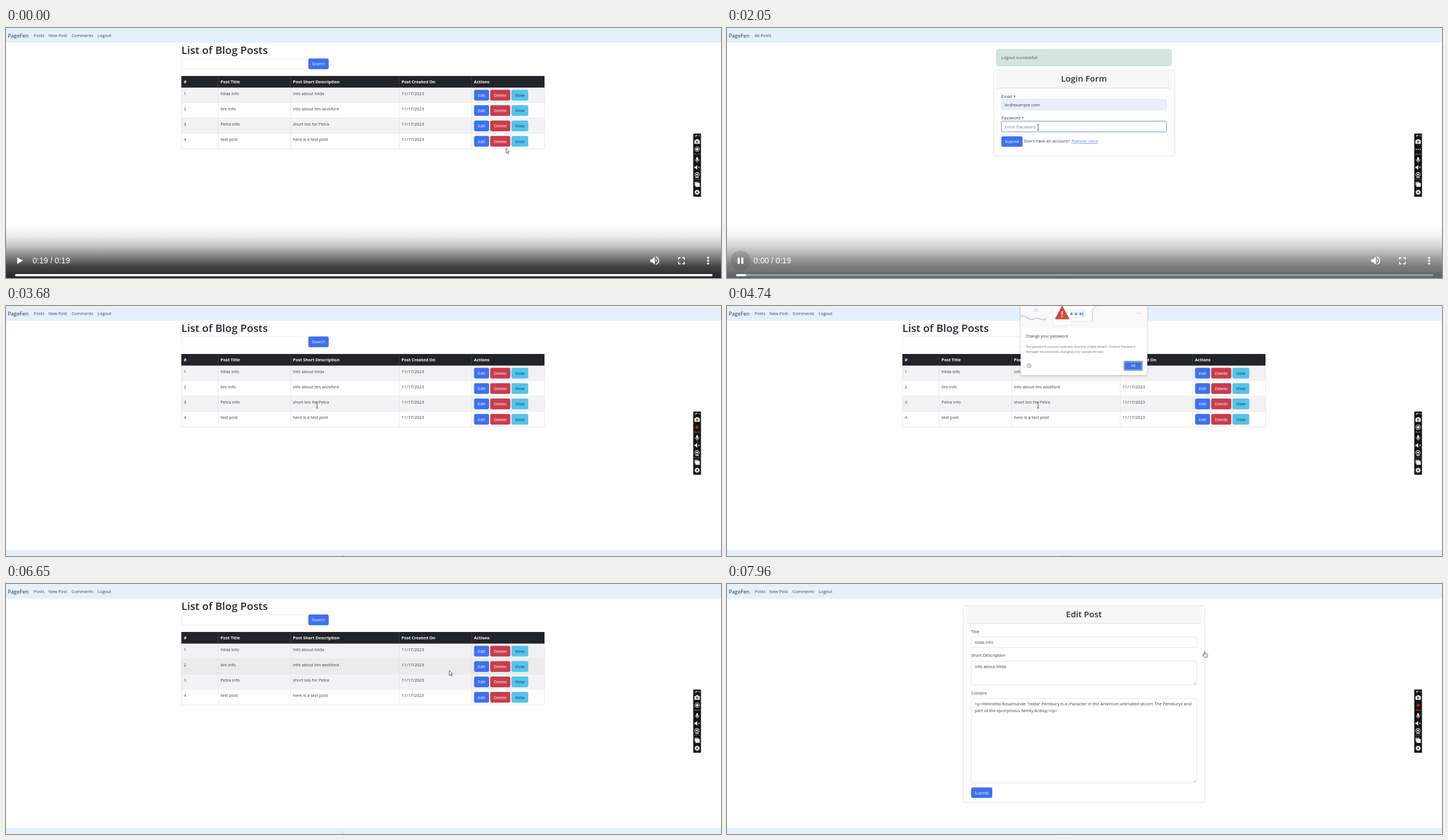
Write an HTML page that moves like this. It is 1264x443 px and loops after 7990 ms.

```html
<!DOCTYPE html>
<html lang="en">
<head>
<meta charset="utf-8">
<title>Blog demo</title>
<style>
html, body { margin: 0; width: 100%; height: 100%; overflow: hidden; background: #fefefe; }
svg { display: block; width: 1264px; height: 443px; }
text { font-family: "Open Sans", "Noto Sans", sans-serif; white-space: pre; }
.clock { font-family: "Liberation Sans", Arial, sans-serif; }
</style>
</head>
<body>
<svg id="stage" viewBox="0 0 1264 443" xmlns="http://www.w3.org/2000/svg"></svg>
<script>
const LOOP = 7990;
const INK = '#383c41', BLUE = '#3d70f4', RED = '#c93c4b', CYAN = '#55c3ec', LINE = '#e1e3e6';
const BRAND = 'PageFen';

// ---- markup helpers ----
const esc = s => s.replace(/&/g, '&amp;').replace(/</g, '&lt;');
const text = (x, y, s, size = 7.5, fill = INK, extra = '') =>
  `<text x="${x}" y="${y}" font-size="${size}" fill="${fill}" ${extra}>${esc(s)}</text>`;
const mid = 'text-anchor="middle"';
const box = (x1, y1, x2, y2, fill, r = 0, extra = '') =>
  `<rect x="${x1}" y="${y1}" width="${x2 - x1}" height="${y2 - y1}" rx="${r}" fill="${fill}" ${extra}/>`;
const frame = (x1, y1, x2, y2, fill = '#fff', stroke = LINE) =>
  box(x1, y1, x2, y2, fill, 3, `stroke="${stroke}" stroke-width=".9"`);
const path = (d, fill = 'none', stroke = 'none', w = 1, extra = '') =>
  `<path d="${d}" fill="${fill}" stroke="${stroke}" stroke-width="${w}" ${extra}/>`;
const dot = (x, y, r, fill, extra = '') => `<circle cx="${x}" cy="${y}" r="${r}" fill="${fill}" ${extra}/>`;
const group = (id, body, extra = '') => `<g id="${id}" ${extra}>${body}</g>`;
const button = (x1, y1, x2, y2, label, fill = BLUE, ink = '#fff', id = '') =>
  box(x1, y1, x2, y2, fill, 3, id && `id="${id}"`) +
  text((x1 + x2) / 2, (y1 + y2) / 2 + 2.8, label, 7.5, ink, mid);

// ---- pages ----
const nav = links => box(0, 0, 1264, 26, '#e4f0fc') + text(3, 16.5, BRAND, 9.4, '#2c3035') +
  links.map(([x, s]) => text(x, 15.6, s, 7.5, '#3d4349')).join('');
const mainNav = nav([[49, 'Posts'], [75, 'New Post'], [116, 'Comments'], [162, 'Logout']]);

const footer = box(0, 432, 1264, 443, '#e4f0fc') +
  text(646, 448, '© 2023 ' + BRAND + ' All rights here', 7.5, '#777', mid);

const COLS = [310, 375, 503, 695, 823, 952];
const HEADS = ['#', 'Post Title', 'Post Short Description', 'Post Created On', 'Actions'];
const POSTS = [
  ['hilda info', 'info about hilda'],
  ['tim info', 'info about tim wickford'],
  ['Petra info', 'short bio for Petra'],
  ['test post', 'here is a test post']
];
const rowTop = i => 105.6 + i * 27.2;

function listPage() {
  let s = mainNav + text(310, 46, 'List of Blog Posts', 18.75, '#25292d', 'font-weight="600"');
  s += frame(310.4, 54.4, 534, 72.6, '#fff', '#e9ebee') + button(534.5, 54, 570.5, 73, 'Search');
  POSTS.forEach(([title, about], i) => {
    const y = rowTop(i);
    s += box(310, y, 952, y + 27.2, '#fff', 0, `id="row${i}"`);
    s += path(`M310 ${y + 27}H952`, 'none', LINE, .8);
    [String(i + 1), title, about, '11/17/2023'].forEach((c, k) => s += text(COLS[k] + 4.3, y + 12.9, c));
    s += button(827.5, y + 4, 854, y + 23, 'Edit');
    s += button(856, y + 4, 891.5, y + 23, 'Delete', RED, '#fff', 'del' + i);
    s += button(893.5, y + 4, 923.3, y + 23, 'View', CYAN, '#16405a');
  });
  COLS.forEach(x => s += path(`M${x + .2} 106V214`, 'none', LINE, .8));
  s += box(310, 85, 952, 105.6, '#212529');
  HEADS.forEach((h, k) => {
    s += text(COLS[k] + 4.3, 98.1, h, 7.4, '#fff', 'font-weight="700"');
    if (k) s += path(`M${COLS[k]} 85V105.6`, 'none', '#43484d', .8);
  });
  return s + footer;
}

function loginPage() {
  let s = nav([[49, 'All Posts']]) + frame(476.5, 38.5, 785.5, 67, '#d4e5dd', '#bcd6c9');
  s += text(485, 55.4, 'Logout successful!', 7.5, '#46574f');
  s += frame(471.3, 75, 791.3, 227, '#fefefe', '#dcdee1') + box(477, 75.5, 785, 106, '#f7f7f8');
  s += path('M477 106.4H785', 'none', '#d6d7da', .9);
  s += text(631, 95.2, 'Login Form', 15, '#2a2e33', mid + ' font-weight="600"');
  s += text(485, 123.5, 'Email *') + frame(485, 126.6, 777, 145, '#e8eefc', '#d9dfee');
  s += text(491, 138.6, 'lin@example.com') + text(485, 162, 'Password *');
  s += box(484, 164, 778, 185, '#c3d2fc', 4) + frame(485.2, 165.4, 776.8, 183.8, '#fff', '#86a6f6');
  s += group('hint', text(491, 177.6, 'Enter Password', 7.5, '#7b8085'));
  for (let i = 0; i < 6; i++) s += dot(493 + i * 3.75, 174.9, 1.4, INK, `id="key${i}"`);
  s += button(485, 192, 522.5, 210.5, 'Submit') + text(525, 203.2, "Don't have an account?");
  s += text(609, 203.2, 'Register Here', 7.5, '#6587ee', 'text-decoration="underline"');
  return s + footer;
}

function editPage() {
  const grip = (x, y) => path(`M${x - 5} ${y}l4-4m-2 4l2-2`, 'none', '#888', .7);
  let s = mainNav + frame(417.5, 38.6, 844.6, 387.2, '#fefefe', '#dcdee1');
  s += box(424, 39, 838, 69.4, '#f8f7f8') + path('M424 69.6H838', 'none', '#d6d7da', .9);
  s += text(631, 58.8, 'Edit Post', 15, '#2a2e33', mid + ' font-weight="600"');
  [['Title', 87, 94, 112.4, 'hilda info'], ['Short Description', 129.3, 136.4, 179, 'info about hilda'],
   ['Content', 195.5, 203, 352.3, '<p>Henrietta Rosamunde "Hilda" Pembury is a character in the American animated sitcom The Pemburys and']
  ].forEach(([label, ly, y1, y2, value], i) => {
    s += text(431.5, ly, label) + frame(431.5, y1, 830.5, y2);
    s += text(438, y1 + 12.1, value);
    if (i) s += grip(830, y2 - 1);
  });
  s += text(438, 227.2, 'part of the eponymous family.&nbsp;</p>');
  return s + button(431.5, 360.4, 469, 379, 'Submit') + footer;
}

// ---- overlays ----
function bubble() {
  let s = box(519, -6, 743, 122.5, '#fff', 4, 'filter="url(#soft)"') + box(519, 0, 743, 40, '#f8f9fa');
  s += path('M519 19c8-7 14 9 24 4s13 6 22-1', 'none', '#c9ccd1', 2);
  s += path('M546 3v9m-4-7l8 5m0-5l-8 5', 'none', '#d3d6da', 1);
  s += path('M576 0V34H609V27H645V10q0-8 9-10', '#fff', '#e0e2e6', .8);
  s += path('M646 27V9q1-6 8-9', 'none', '#c9ccd1', 1.2);
  s += path('M722 14q1-3 3-2q3-3 4 0q3-1 3 2z', '#e3e5e8');
  s += box(600, 8, 633, 20, '#fff', 1, 'stroke="#c7d6f5" stroke-width="1"');
  [609, 617, 625].forEach(x => s += path(`M${x} 11v6m-2.6-4.5l5.2 3m0-3l-5.2 3`, 'none', '#3f6fd6', 1));
  s += path('M629 10.5v7', 'none', '#3f6fd6', 1.2);
  s += path('M592.5 1L604 22.5H581z', '#d64a40', '#d64a40', 2, 'stroke-linejoin="round"');
  s += path('M592.5 9v6.5m0 2v2', 'none', '#fff', 1.9);
  s += text(528, 56.2, 'Change your password', 7, '#33373b');
  s += text(528, 73.6, 'The password you just used was found in a data breach. Ombrel Password', 5.6, '#666b70');
  s += text(528, 83, 'Manager recommends changing your password now.', 5.6, '#666b70');
  s += dot(534, 106, 3.3, 'none', 'stroke="#5f6368" stroke-width=".8"') + path('M534 105.5v2.2m0-3.8v.8', 'none', '#5f6368', .9);
  s += box(701.5, 97.5, 734.5, 114.5, '#2f5fc4', 2) + box(702.6, 98.6, 733.4, 113.4, '#b9cdf6', 2) +
    box(703.6, 99.6, 732.4, 112.4, '#3f72de', 1.5);
  return s + text(718, 108, 'OK', 5.4, '#fff', mid + ' font-weight="600"');
}

function recorder() {
  const w = '#f2f2f2';
  let s = box(1215, 187, 1228.6, 299, '#131313', 1);
  s += path('M1218 193l2.5-4m-1 4l2.5-4m-4 1.5h4m1.5.5h4', 'none', '#c9c9c9', .8);
  s += box(1217, 198.5, 1226.5, 205.2, w, 1) + box(1219.8, 197, 1223.8, 199.5, w) + dot(1221.8, 201.8, 2, '#131313') + dot(1221.8, 201.8, 1.1, w);
  s += group('wait', [1218.5, 1222, 1225.5].map(x => dot(x, 215, 1, w)).join(''));
  s += group('rec', dot(1221.8, 214.8, 4, 'none', 'id="ring" stroke-width="1.1"') + dot(1221.8, 214.8, 2.4, w, 'id="core"'));
  s += `<text id="timer" x="1221.8" y="225" font-size="4" fill="#aaa" text-anchor="middle"></text>`;
  s += box(1220.2, 228.8, 1223.4, 235, w, 1.6) + path('M1218.3 232.5q0 4 3.5 4t3.5-4M1221.8 236.5v2', 'none', w, .9);
  s += path('M1217 245.5h2l3-2.6v8.2l-3-2.6h-2z', w) + path('M1223.5 245.5l3 3m0-3l-3 3', 'none', w, .8);
  s += dot(1221.6, 259.8, 3.7, 'none', `stroke="${w}" stroke-width="1.1"`) + dot(1221.6, 259.8, 1.7, w) + path('M1218.5 265h6.5', 'none', w, 1.2);
  s += path('M1216 268.6h12', 'none', '#777', .7);
  s += box(1217, 272.5, 1224.5, 279, '#aaa', .5) + box(1218.8, 274.8, 1226.5, 281.5, w, .5);
  s += dot(1221.8, 291, 3.7, 'none', `stroke="${w}" stroke-width="1.8" stroke-dasharray="1.9 1"`);
  return s + dot(1221.8, 291, 2.4, 'none', `stroke="${w}" stroke-width="1.8"`);
}

function controls() {
  const stops = [[0, 0], [.2, .07], [.4, .24], [.6, .5], [.78, .74], [1, .84]];
  let s = `<linearGradient id="shade" x2="0" y2="1">${stops.map(([o, a]) =>
    `<stop offset="${o}" stop-opacity="${a}"/>`).join('')}</linearGradient>`;
  s += box(0, 350, 1264, 443, 'url(#shade)') + dot(24, 412, 17.6, '#000', 'id="halo"');
  s += group('play', path('M19.8 406.5L29.8 412.3L19.8 418z', '#fff'));
  s += group('pause', box(18.7, 406.8, 22.4, 417.8, '#fff') + box(25.2, 406.8, 28.9, 417.8, '#fff'));
  s += `<text id="clock" class="clock" x="47" y="417.3" font-size="14" fill="#fff"></text>`;
  s += path('M1139 409.7h3.4l4.6-4.4v14l-4.6-4.4h-3.4z', '#fff');
  s += path('M1148.8 408.6q3 3.7 0 7.4z', '#fff') + path('M1148.8 405.6q5 1.6 5 6.7t-5 6.7', 'none', '#fff', 1.6);
  s += path('M1189 410.3v-3.5h3.5m3 0h3.5v3.5m0 4v3.5h-3.5m-3 0h-3.5v-3.5', 'none', '#fff', 1.8);
  [407.2, 412.3, 417.4].forEach(y => s += dot(1241.2, y, 1.8, '#fff'));
  return s + box(16, 436, 1249, 440, '#fff', 2, 'fill-opacity=".32"') +
    '<rect id="bar" x="16" y="436" height="4" rx="2" fill="#fff"/>';
}

const cursors =
  group('arrow', path('M0 0V8.6L2 6.8L3.4 9.8L4.9 9.1L3.5 6.2H6z', '#fff', '#333', .8)) +
  group('beam', path('M-2 -5h1.4l.6.6.6-.6h1.4M-2 5h1.4l.6-.6.6.6h1.4M0-4.4V4.4', 'none', '#333', .9)) +
  group('hand', path('M-.9 .8q.9-1.4 1.8 0V4l3.6.9q1.2.4 1 1.6L4.7 10.4H-.2L-3.4 6.8q0-1.4 1.2-1l1.3 1z', '#fff', '#333', .8));

const stage = document.getElementById('stage');
stage.innerHTML =
  '<filter id="soft" x="-10%" y="-10%" width="120%" height="125%"><feDropShadow dx="0" dy="1" stdDeviation="1.6" flood-opacity=".35"/></filter>' +
  box(0, 0, 1264, 443, '#fefefe') +
  group('list', listPage()) + group('login', loginPage()) + group('edit', editPage()) +
  group('bubble', bubble()) + group('recorder', recorder()) + group('cursor', cursors) + group('controls', controls());

// ---- timeline ----
const START = 1680, LOGGED_IN = 3510, MOVE = 5510, ON_BUTTON = 6950, EDIT = 7600;
const KEYS = [2600, 2750, 2900, 3050, 3310, 3370];
const TRACK = [
  [0, 884, 213], [START - 1, 884, 213], [START, 550, 176], [MOVE - 1, 550, 176], [MOVE, 550, 172],
  [5820, 589, 174], [6280, 690, 172], [6370, 690, 172], [6700, 800, 150], [ON_BUTTON, 866, 125],
  [7130, 849.5, 123.4], [7700, 849.5, 123.4], [7900, 844.3, 119.4], [LOOP, 844.3, 119.4]
];
const $ = id => document.getElementById(id);
const show = (id, on) => $(id).setAttribute('visibility', on ? 'inherit' : 'hidden');
const set = (id, name, v) => $(id).setAttribute(name, v);
const ramp = (t, a, b) => Math.min(1, Math.max(0, (t - a) / (b - a)));

function place(t) {
  const i = Math.max(1, TRACK.findIndex(p => p[0] > t));
  const [ta, xa, ya] = TRACK[i - 1], [tb, xb, yb] = TRACK[i];
  const k = ramp(t, ta, tb);
  return [xa + (xb - xa) * k, ya + (yb - ya) * k];
}

function draw(t) {
  const ended = t < START, login = !ended && t < LOGGED_IN, edit = t >= EDIT;
  show('list', !login && !edit);
  show('login', login);
  show('edit', edit);

  const typed = KEYS.filter(k => t >= k).length;
  show('hint', !typed);
  KEYS.forEach((_, i) => show('key' + i, i < typed));

  const [x, y] = place(t);
  set('cursor', 'transform', `translate(${x} ${y})`);
  const hand = t >= ON_BUTTON, beam = !ended && t < MOVE;
  show('hand', hand);
  show('beam', beam);
  show('arrow', !hand && !beam);

  POSTS.forEach((_, i) => {
    const over = t >= MOVE && y >= rowTop(i) && y < rowTop(i + 1);
    set('row' + i, 'fill', over ? '#ebebec' : i % 2 ? '#fefefe' : '#f2f2f4');
    set('del' + i, 'fill', i === 0 && hand ? '#b5343f' : RED);
  });

  set('bubble', 'opacity', ramp(t, 4080, 4200) * (1 - ramp(t, 5000, 5100)));

  const waiting = !ended && t < 2600;
  show('wait', waiting);
  show('rec', !waiting);
  const pulse = ended ? 0 : ramp(Math.cos((t - 1750) * Math.PI / 1000), -.35, .55);
  const mix = (a, b) => Math.round(a + (b - a) * pulse);
  set('core', 'fill', `rgb(${mix(242, 214)},${mix(242, 38)},${mix(242, 38)})`);
  set('ring', 'stroke', `rgb(${mix(225, 90)},${mix(225, 20)},${mix(225, 20)})`);
  const sec = ended ? 19 : Math.max(0, Math.floor((t - 3000) / 1000));
  $('timer').textContent = '00:' + String(sec).padStart(2, '0');

  set('controls', 'opacity', 1 - ramp(t, 1960, 2260));
  set('halo', 'opacity', .26 * ramp(t, 1330, 1480));
  show('play', ended);
  show('pause', !ended);
  $('clock').textContent = (ended ? '0:19' : '0:00') + ' / 0:19';
  set('bar', 'width', ended ? 1233 : 1233 * ramp(t, 1770, 20770));
}

const t0 = performance.now();
function tick() {
  draw((performance.now() - t0) % LOOP);
  requestAnimationFrame(tick);
}
tick();
</script>
</body>
</html>
```
